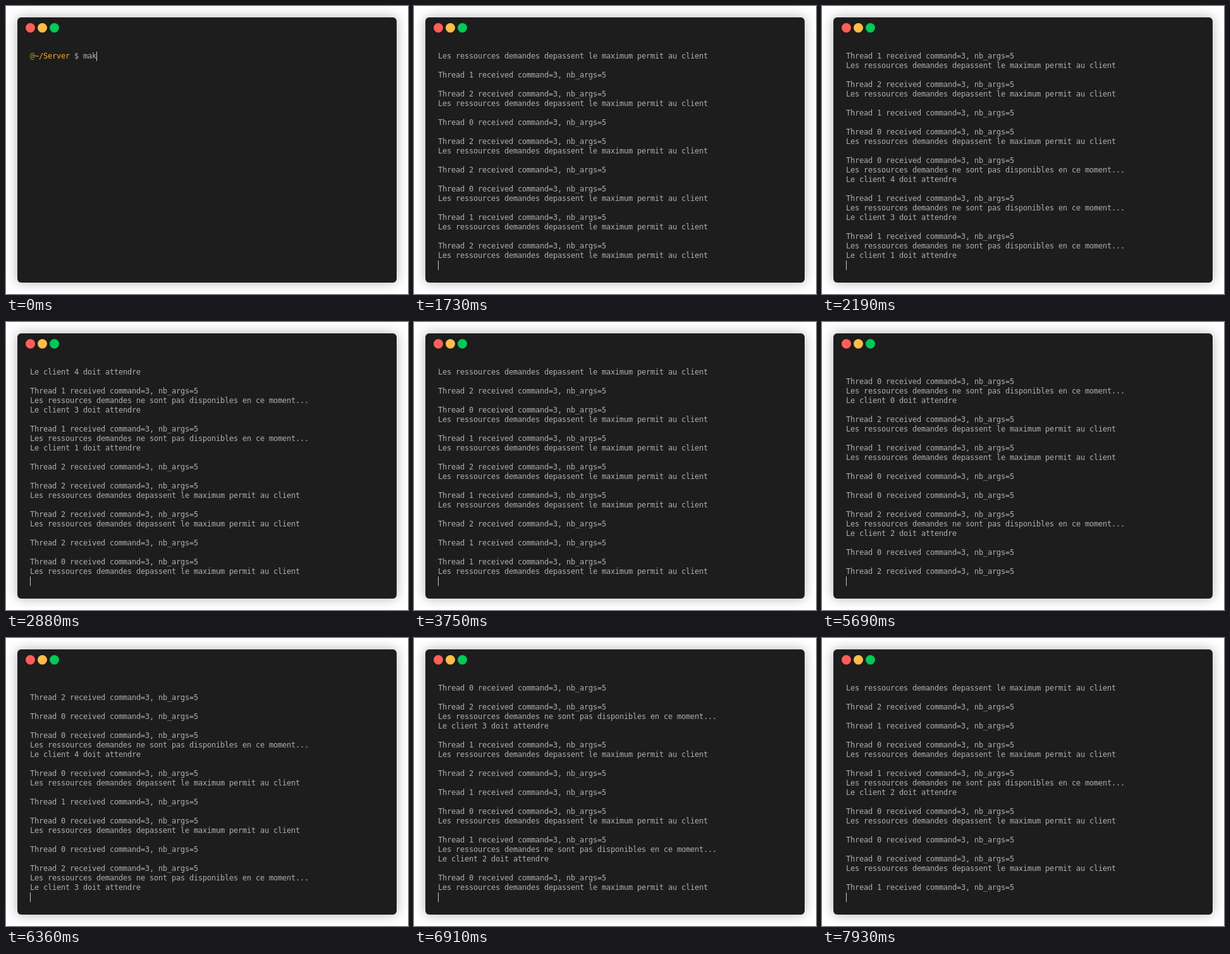
These frames come from a looping animation (636 px wide and 455 px high, 7.99 s). An HTML page:

```html
<!DOCTYPE html>
<html lang="fr">
<head>
<meta charset="utf-8">
<title>Terminal</title>
<style>
  html, body { margin: 0; width: 100%; height: 100%; overflow: hidden; background: #fff; }
  #win {
    position: absolute; left: 18px; top: 18px; width: 600px; height: 419px;
    border-radius: 6px; background: #1d1d1d; box-shadow: 0 0 18px rgba(0, 0, 0, .3);
  }
  .dot { position: absolute; top: 9px; width: 15px; height: 15px; border-radius: 50%; }
  #text {
    position: absolute; left: 20px; top: 54px; margin: 0; color: #afafaf;
    font: 12px/15px "DejaVu Sans Mono", monospace; letter-spacing: calc(7px - 1ch);
  }
  .user { color: #b3a23b; }
  .path { color: #ffa727; }
  #cursor { position: absolute; width: 1px; height: 15px; background: #c7c7c7; }
</style>
</head>
<body>
<div id="win">
  <i class="dot" style="left:13px;background:#ff5f58"></i>
  <i class="dot" style="left:32px;background:#ffbd4a"></i>
  <i class="dot" style="left:51px;background:#00c957"></i>
  <pre id="text"></pre>
  <i id="cursor"></i>
</div>
<script>
const LOOP = 7990, ROWS = 23, CELL_W = 7, CELL_H = 15;
const PROMPT = '@~/Server $ ';
const PROMPT_HTML = '<span class="user">@</span><span class="path">~/Server</span> $ ';

// [time, command typed so far]
const typing = [
  [0, 'mak'], [100, 'make'], [340, 'make '], [420, 'make r'], [660, 'make ru'], [760, 'make run']
];

// [time, requests]: thread number, then D = denied or W + waiting client
const output = [
  [860, ''],
  [1610, '0D 1 2D 0 2D'], [1730, '2 0D 1D 2D'], [1780, '1'], [1820, '0D'], [1870, '0W4'],
  [2120, '1W3'], [2180, '1W1'], [2240, '2'], [2620, '2D 2D'], [2880, '2 0D'],
  [2970, '1D 2D 1D'], [3200, '2'], [3510, '1'], [3750, '1D'], [3810, '2D'],
  [3960, '0W0'], [3990, '2D'], [4030, '1D'], [4060, '0'], [4500, '0 2W2 0'],
  [5690, '2'], [5820, '0'], [5880, '0W4'], [5940, '0D'], [6000, '1'], [6060, '0D'], [6120, '0'],
  [6360, '2W3'], [6520, '1D 2'], [6590, '1'], [6760, '0D'], [6840, '1W2'], [6910, '0D'],
  [7850, '0 0D'], [7930, '1']
];

function requestLines([thread, result, client]) {
  const lines = ['', `Thread ${thread} received command=3, nb_args=5`];
  if (result === 'D') lines.push('Les ressources demandes depassent le maximum permit au client');
  if (result === 'W') lines.push(
    'Les ressources demandes ne sont pas disponibles en ce moment...',
    `Le client ${client} doit attendre`
  );
  return lines;
}

const states = typing.map(([time, cmd]) => ({
  time, lines: [PROMPT_HTML + cmd], col: PROMPT.length + cmd.length, row: 0
}));

let log = [PROMPT_HTML + 'make run'];
for (const [time, requests] of output) {
  const added = requests.split(' ').filter(Boolean).flatMap(requestLines);
  log = [...log, ...added].slice(1 - ROWS);
  states.push({ time, lines: log, col: 0, row: log.length });
}

const text = document.getElementById('text');
const cursor = document.getElementById('cursor');
let shown;

function draw() {
  const t = performance.now() % LOOP;
  const state = states.filter(s => s.time <= t).pop();
  if (state !== shown) {
    shown = state;
    // The extra newline keeps a leading blank row from being dropped
    text.innerHTML = state.lines.map(line => line || ' ').join('\n');
    cursor.style.left = 20 + state.col * CELL_W + 'px';
    cursor.style.top = 54 + state.row * CELL_H + 'px';
  }
  requestAnimationFrame(draw);
}
draw();
</script>
</body>
</html>
```
